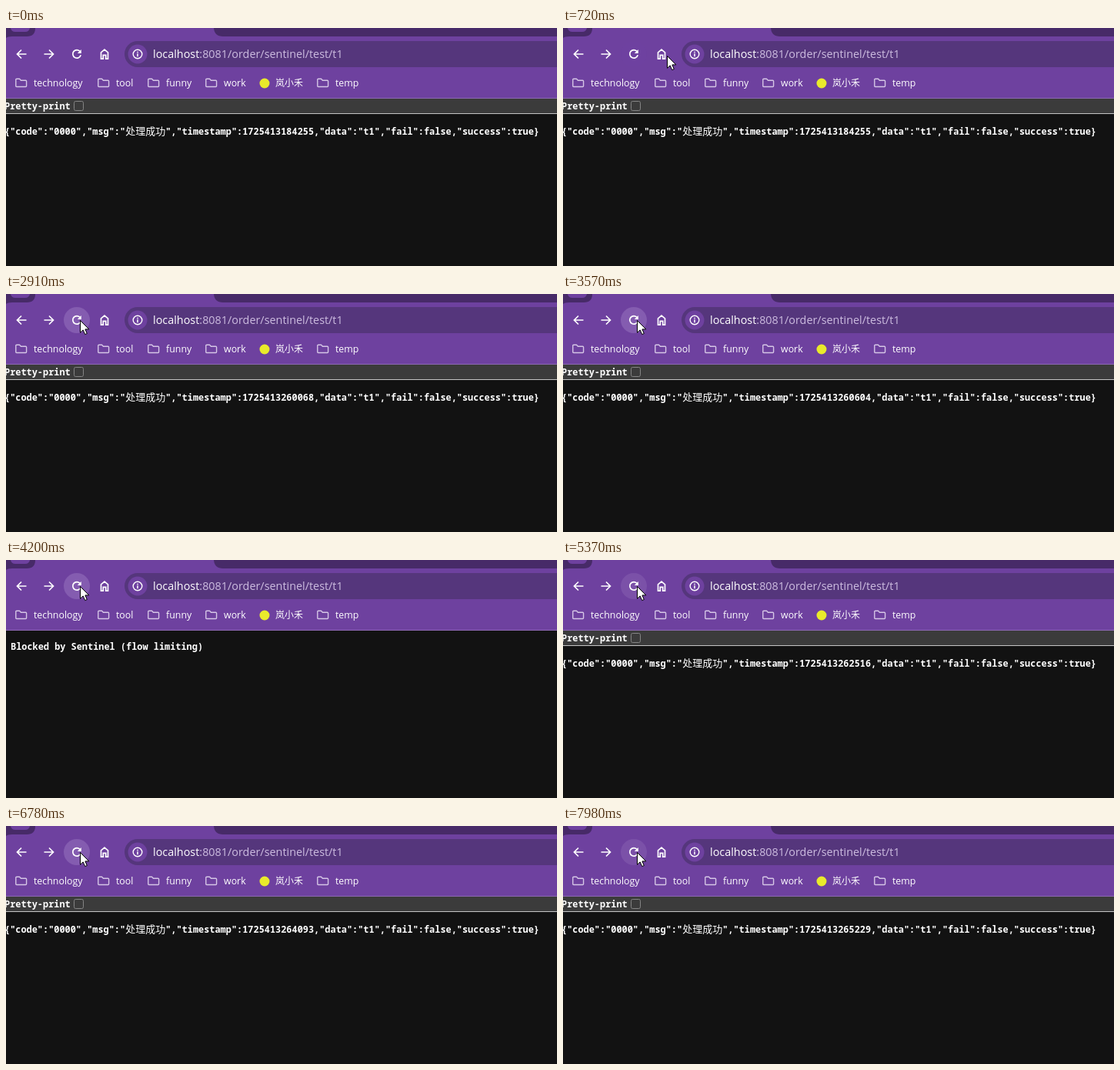
Animation, 716 px wide and 310 px high, one loop 8000 ms. Source, as an HTML page:

```html
<!DOCTYPE html>
<html lang="en">
<head>
<meta charset="utf-8">
<title>Flow limiting</title>
<style>
html, body { margin: 0; width: 100%; height: 100%; overflow: hidden; background: #121212; }
svg { display: block; width: 716px; height: 310px; }
.ui { font-family: "Open Sans", "Noto Sans", sans-serif; fill: #fff; }
.url { font-size: 14.4px; }
.path { fill: #cdbde0; }
.marks { font-size: 12.4px; font-weight: 500; }
.cjk { font-family: "Noto Sans CJK SC", "Noto Sans CJK", sans-serif; }
.page { font: 600 11.91px "Noto Sans Mono", monospace; fill: #fff; white-space: pre; }
.page .cjk { font-size: 13px; font-weight: 500; }
.icon { fill: none; stroke: #fff; stroke-width: 1.7; }
.folder { fill: none; stroke: #d5c6e6; stroke-width: 1.4; stroke-linejoin: round; }
</style>
</head>
<body>
<svg viewBox="0 0 716 310">
  <defs>
    <path id="folder" class="folder" d="M.8 1.8Q.8.8 1.8.8H5.6L7.4 2.7H13.6Q14.6 2.7 14.6 3.7V10Q14.6 11 13.6 11H1.8Q.8 11 .8 10Z"/>
  </defs>

  <rect width="716" height="92" fill="#6e419f"/>
  <path d="M270 0Q271 11 282 11H716V0Z" fill="#472a68"/>
  <path d="M0 0H38Q38 11 27 11H8Q2 11 0 13Z" fill="#472a68"/>
  <path d="M6 0H31Q30 5 25 5H12Q7 5 6 0Z" fill="#6e419f"/>
  <path d="M716 17H171A17 17 0 0 0 171 51H716Z" fill="#55367c"/>
  <circle cx="171" cy="34" r="12.5" fill="#6e419f"/>
  <rect y="91" width="716" height="1" fill="#8d69b3"/>

  <circle id="hover" cx="92" cy="34" r="17" fill="#845cb0" opacity="0"/>
  <g class="icon">
    <path d="M26.5 34H14.8M20 28.5L14.5 34L20 39.5"/>
    <path d="M49.500 34H61.200M56 28.500L61.500 34L56 39.500"/>
    <path d="M96.300 30.600A5.300 5.300 0 1 0 97.200 35.300"/>
    <path d="M123.500 40.200V31.800L128 28.200L132.500 31.800V40.200H129.700V35.300H126.300V40.200Z"/>
    <circle cx="171" cy="34" r="5.800" stroke-width="1.400"/>
    <path d="M171 33.300V37.200M171 30.700V32.200" stroke-width="1.500"/>
  </g>
  <path d="M97.800 28V33H92.800Z" fill="#fff"/>

  <text class="ui url" x="191" y="39">localhost<tspan class="path">:8081/order/sentinel/test/t1</tspan></text>
  <g id="marks" class="ui marks">
    <circle cx="336" cy="72" r="6.500" fill="#e9ea2b"/>
    <text class="cjk" x="350" y="76.300" font-size="12">岚小禾</text>
  </g>

  <g id="json" class="page">
    <rect y="92" width="716" height="19" fill="#3b3b3b"/>
    <rect y="111" width="716" height="1" fill="#c4c4c4"/>
    <text x="-2" y="106">Pretty-print</text>
    <rect x="88.500" y="95.500" width="12" height="12" rx="2" fill="#3b3b3b" stroke="#858585"/>
    <text x="-2" y="139">{"code":"0000","msg":"<tspan class="cjk">处理成功</tspan>","timestamp":<tspan id="stamp">1725413184255</tspan>,"data":"t1","fail":false,"success":true}</text>
  </g>
  <text id="blocked" class="page" x="6" y="117" visibility="hidden">Blocked by Sentinel (flow limiting)</text>

  <path id="cursor" d="M.5.5V16.300L4.200 12.900L6.700 18.600L9.300 17.500L6.900 11.900H11.800Z" fill="#fff" stroke="#000" stroke-linejoin="round" visibility="hidden"/>
</svg>
<script>
const LOOP = 8000;
const $ = id => document.getElementById(id);
const show = (el, on) => el.setAttribute('visibility', on ? 'visible' : 'hidden');
const clamp = v => Math.max(0, Math.min(1, v));

// [time, last six digits of the timestamp]; 0 means the request was blocked
const loads = [
  [0, 184255], [960, 258043], [1650, 258742], [1860, 258951], [2010, 259102],
  [2160, 0], [2340, 259438], [2910, 260068], [3030, 260187], [3180, 0],
  [3450, 260604], [3600, 260757], [3750, 0], [4050, 261207], [4200, 0],
  [4350, 261502], [4500, 261650], [4650, 0], [5100, 262251], [5220, 0],
  [5370, 262516], [5460, 0], [5820, 262987], [5970, 263136], [6120, 0],
  [6480, 263721], [6630, 0], [6780, 264093], [6930, 0], [7110, 264272],
  [7260, 264412], [7410, 264562], [7560, 0], [7710, 264953], [7860, 265109], [7980, 265229]
];

// pointer stops: [time, x, y]
const stops = [
  [60, 641, 52], [300, 420, 44], [540, 180, 33], [840, 105, 38],
  [1200, 105, 38], [1410, 92, 35], [2340, 92, 35], [2370, 96, 34], [LOOP, 96, 34]
];

const dimmed = [[5370, 5460], [7860, LOOP]];

for (const [x, label] of [[12, 'technology'], [119, 'tool'], [184, 'funny'], [259, 'work'], [404, 'temp']]) {
  $('marks').insertAdjacentHTML('beforeend',
    `<use href="#folder" x="${x}" y="65.500"/><text x="${x + 24}" y="76">${label}</text>`);
}

function pointerAt(t) {
  const i = Math.max(1, stops.findIndex(s => s[0] > t));
  const [t0, x0, y0] = stops[i - 1], [t1, x1, y1] = stops[i];
  const k = clamp((t - t0) / (t1 - t0));
  return [x0 + (x1 - x0) * k, y0 + (y1 - y0) * k].map(Math.round);
}

function draw(t) {
  const value = loads.filter(l => l[0] <= t).pop()[1];
  show($('json'), value);
  show($('blocked'), !value);
  if (value) $('stamp').textContent = '1725413' + value;

  const [x, y] = pointerAt(t);
  show($('cursor'), t >= 60);
  $('cursor').setAttribute('transform', `translate(${x} ${y})`);

  const dim = dimmed.some(([a, b]) => t >= a && t < b);
  $('hover').setAttribute('opacity', dim ? 0.6 : clamp((t - 720) / 120));
}

const start = performance.now();
function tick() {
  draw((performance.now() - start) % LOOP);
  requestAnimationFrame(tick);
}
tick();
</script>
</body>
</html>
```
